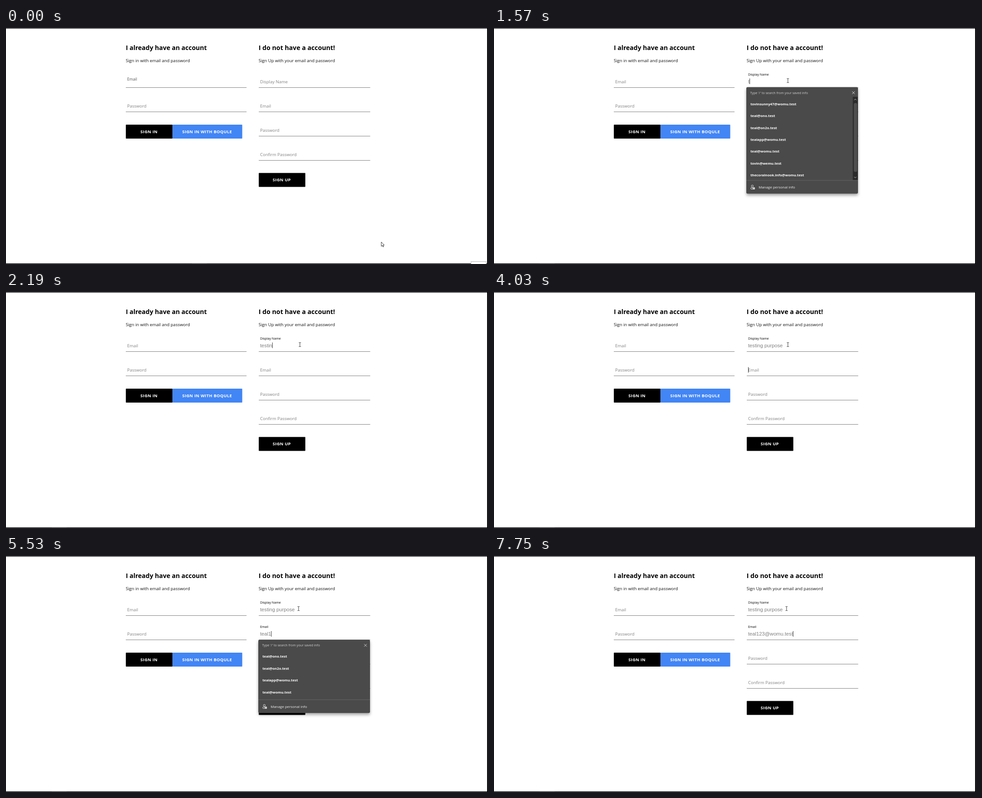
Recreate the animation shown at these times as an HTML page. Size 1066x525 px, loop 8000 ms.

```html
<!DOCTYPE html>
<html lang="en">
<head>
<meta charset="utf-8">
<title>Sign in and sign up</title>
<style>
  html, body { margin: 0; width: 100%; height: 100%; overflow: hidden; background: #fff; }
  svg { display: block; width: 100%; height: 100%; }
  text { font-family: "Open Sans", "Noto Sans", sans-serif; white-space: pre; }
  .bold { font-weight: 700; }
  .button { font-weight: 700; font-size: 9.375px; letter-spacing: .3125px; fill: #fff; }
  .typed { font-family: "Liberation Sans", Arial, sans-serif; font-size: 11.2px; fill: #808080; }
  .panel { filter: drop-shadow(0 4px 3px rgba(0, 0, 0, .35)); }
</style>
</head>
<body>
<svg id="stage" viewBox="0 0 1066 525" preserveAspectRatio="none"></svg>
<script>
const LOOP = 8000;
const ROW = 54;
const GREY = '#808080';
const stage = document.getElementById('stage');

const rect = (x, y, w, h, fill, extra = '') =>
  `<rect x="${x}" y="${y}" width="${w}" height="${h}" fill="${fill}" ${extra}/>`;
const text = (x, y, size, str, fill = '#000', cls = '') =>
  `<text x="${x}" y="${y}" font-size="${size}" fill="${fill}" class="${cls}">${str}</text>`;
const stroke = (d, color, width = 1) =>
  `<path d="${d}" fill="none" stroke="${color}" stroke-width="${width}"/>`;
const button = (x, y, w, textX, str, fill) =>
  rect(x, y, w, 31, fill, 'rx="1"') +
  `<text x="${textX}" y="${y + 18.6}" class="button">${str}</text>`;
const field = (x, w, row, str, id = '') =>
  rect(x, 132 + ROW * row, w, 1, GREY) +
  `<text id="${id}" x="${x + 3}" y="${123.3 + ROW * row}" font-size="9.47" fill="${GREY}">${str}</text>`;

const allMails = ['tovinsunny47@womu.test', 'teal@ono.test', 'teal@on2o.test', 'tealapp@womu.test',
  'teal@womu.test', 'tovin@wemu.test', 'thecoralnook.info@womu.test'];

// Suggestion panel, drawn from its own top left corner.
function panel(id, mails, h, scrolls) {
  const sep = h - 30;
  let s = rect(0, 0, 247, h, '#4a4a4a', 'rx="3" class="panel"') +
    text(8.5, 15.2, 7.2, "Type '/' to search from your saved info", '#d2d2d2') +
    stroke('M234 9.5l6 6m0 -6l-6 6', '#ddd', .9);
  mails.forEach((m, i) => s += text(9.2, 40.3 + 26.35 * i, 7.8, m, '#fff', 'bold'));
  if (scrolls) {
    s += rect(235.5, 21.5, 11, sep - 21.5, '#2b2b2b') +
      rect(237.8, 35.5, 7.4, 153, '#4f4f4f', 'rx="3"') +
      stroke('M238.5 29l2.5 -2.5l2.5 2.5M238.5 199.5l2.5 2.5l2.5 -2.5', '#ccc', .9);
  }
  s += rect(0, sep, 247, 1, '#666') +
    `<g transform="translate(9 ${h - 19.5})">` +
    '<circle cx="4.3" cy="2.6" r="2.2" fill="none" stroke="#eee" stroke-width=".9"/>' +
    stroke('M5 9.5H2.2C.2 9.5 .2 6.2 2 6.2H5', '#eee', .9) +
    rect(5.2, 5.6, 4.8, 4.4, '#eee', 'rx="1"') + rect(6.4, 7.4, 2.4, .8, '#4a4a4a') + '</g>' +
    text(27.3, h - 11.5, 7.93, 'Manage personal info', '#f0f0f0');
  return `<g id="${id}">${s}</g>`;
}

stage.innerHTML =
  rect(0, 0, 1066, 525, '#fff') +
  text(265, 49, 14, 'I already have an account', '#000', 'bold') +
  text(558.7, 49, 14.2, 'I do not have a account!', '#000', 'bold') +
  text(265, 76, 9.47, 'Sign in with email and password', '#111') +
  text(558.7, 76, 9.47, 'Sign Up with your email and password', '#111') +
  field(265, 267, 0, 'Email', 'loginLabel') +
  field(265, 267, 1, 'Password') +
  button(265, 215, 103.5, 297.3, 'SIGN IN', '#000') +
  button(368.5, 215, 154, 389.8, 'SIGN IN WITH BOQULE', '#4285f4') +
  field(559, 246.5, 0, 'Display Name', 'nameLabel') +
  field(559, 246.5, 1, 'Email', 'mailLabel') +
  field(559, 246.5, 2, 'Password') +
  field(559, 246.5, 3, 'Confirm Password') +
  button(559, 322.5, 103, 589.8, 'SIGN UP', '#000') +
  '<text id="nameText" class="typed" x="562" y="122.5"></text>' +
  '<text id="mailText" class="typed" x="562" y="177"></text>' +
  rect(0, 0, 1, 12.5, '#333', 'id="caret"') +
  panel('longList', allMails, 237, true) +
  panel('shortList', allMails.slice(1, 5), 163, false) +
  rect(0, 0, 1066, 1.4, '#333') +
  rect(0, 523.7, 1066, 1.3, '#000') +
  rect(1064, 0, 2, 525, '#000') +
  rect(0, 523.7, 33, 1.3, '#3c3c3c', 'id="mark"') +
  rect(1028.5, 519.5, 33.5, 7, '#fff', 'id="tip" stroke="#b5b5b5"') +
  '<path id="arrow" d="M0 0V9.6L2.2 7.6L3.8 11L5.3 10.3L3.8 7H6.6Z" fill="#fff" stroke="#222" stroke-width=".9"/>' +
  '<path id="beam" d="M-2.3 -4.5H-.6L0 -4L.6 -4.5H2.3M0 -4V4M-2.3 4.5H-.6L0 4L.6 4.5H2.3" fill="none" stroke="#222" stroke-width=".9"/>';

const el = {};
stage.querySelectorAll('[id]').forEach(n => { if (n.id) el[n.id] = n; });

const clamp = v => Math.max(0, Math.min(1, v));
const mix = (a, b, p) => a + (b - a) * p;
const smooth = v => { const p = clamp(v); return p * p * (3 - 2 * p); };
const show = (node, on) => node.setAttribute('visibility', on ? 'visible' : 'hidden');
const move = (node, x, y) => node.setAttribute('transform', `translate(${x} ${y})`);

// The CSS "ease" curve, solved by bisection.
function ease(v) {
  const x = clamp(v);
  const bez = (a, b, u) => 3 * a * u * (1 - u) ** 2 + 3 * b * u * u * (1 - u) + u ** 3;
  let lo = 0, hi = 1;
  for (let i = 0; i < 24; i++) {
    const mid = (lo + hi) / 2;
    if (bez(.25, .25, mid) < x) lo = mid; else hi = mid;
  }
  return bez(.1, 1, lo);
}

const typing = {
  name: { str: 'testing purpose', at: [1500, 1690, 2000, 2060, 2120, 2190, 2320, 2390,
    2570, 2750, 2880, 3410, 3530, 3660, 3780] },
  mail: { str: 'teal123@womu.test', at: [4800, 5030, 5200, 5460, 5530, 5670, 5780, 6250,
    6760, 6860, 7000, 7120, 7320, 7500, 7580, 7660, 7750] }
};
const typed = ({ str, at }, t) => str.slice(0, at.filter(a => a <= t).length);

function floatLabel(node, row, p) {
  const c = Math.round(mix(128, 0, p));
  node.setAttribute('y', 123.3 + ROW * row - 17 * p);
  node.setAttribute('font-size', mix(9.47, 7.1, p));
  node.setAttribute('fill', `rgb(${c},${c},${c})`);
}

function pointer(t) {
  if (t >= 4800) return [mix(650, 647, clamp((t - 4800) / 70)), 117];
  const up = smooth((t - 60) / 500), back = smooth((t - 560) / 210);
  return [mix(mix(830, 648, up), 650, back), mix(mix(476, 91, up), 117, back)];
}

function draw(t) {
  floatLabel(el.loginLabel, 0, 1 - ease((t + 110) / 300));
  floatLabel(el.nameLabel, 0, ease((t - 950) / 300));
  floatLabel(el.mailLabel, 1, ease((t - 4030) / 300));

  el.nameText.textContent = typed(typing.name, t);
  el.mailText.textContent = typed(typing.mail, t);

  const inMail = t >= 4030;
  const active = inMail ? el.mailText : el.nameText;
  const width = active.textContent ? active.getComputedTextLength() : 0;
  move(el.caret, 562 + width, inMail ? 167 : 112.3);
  show(el.caret, t >= 950 && !(t >= 4580 && t < 4800));

  show(el.longList, t >= 1010 && t < 1820);
  show(el.shortList, (t >= 1820 && t < 2120) || (t >= 5030 && t < 5600));
  move(el.longList, 558, 131.5);
  move(el.shortList, 558, inMail ? 186.2 : 131.5);

  const [x, y] = pointer(t);
  const overField = y > 108 && y < 133;
  show(el.arrow, !overField);
  show(el.beam, overField);
  move(overField ? el.beam : el.arrow, x, y);

  show(el.tip, t < 60);
  move(el.mark, t < 950 ? 411 : 101, 0);
}

const start = performance.now();
function tick() {
  draw((performance.now() - start) % LOOP);
  requestAnimationFrame(tick);
}
tick();
</script>
</body>
</html>
```
